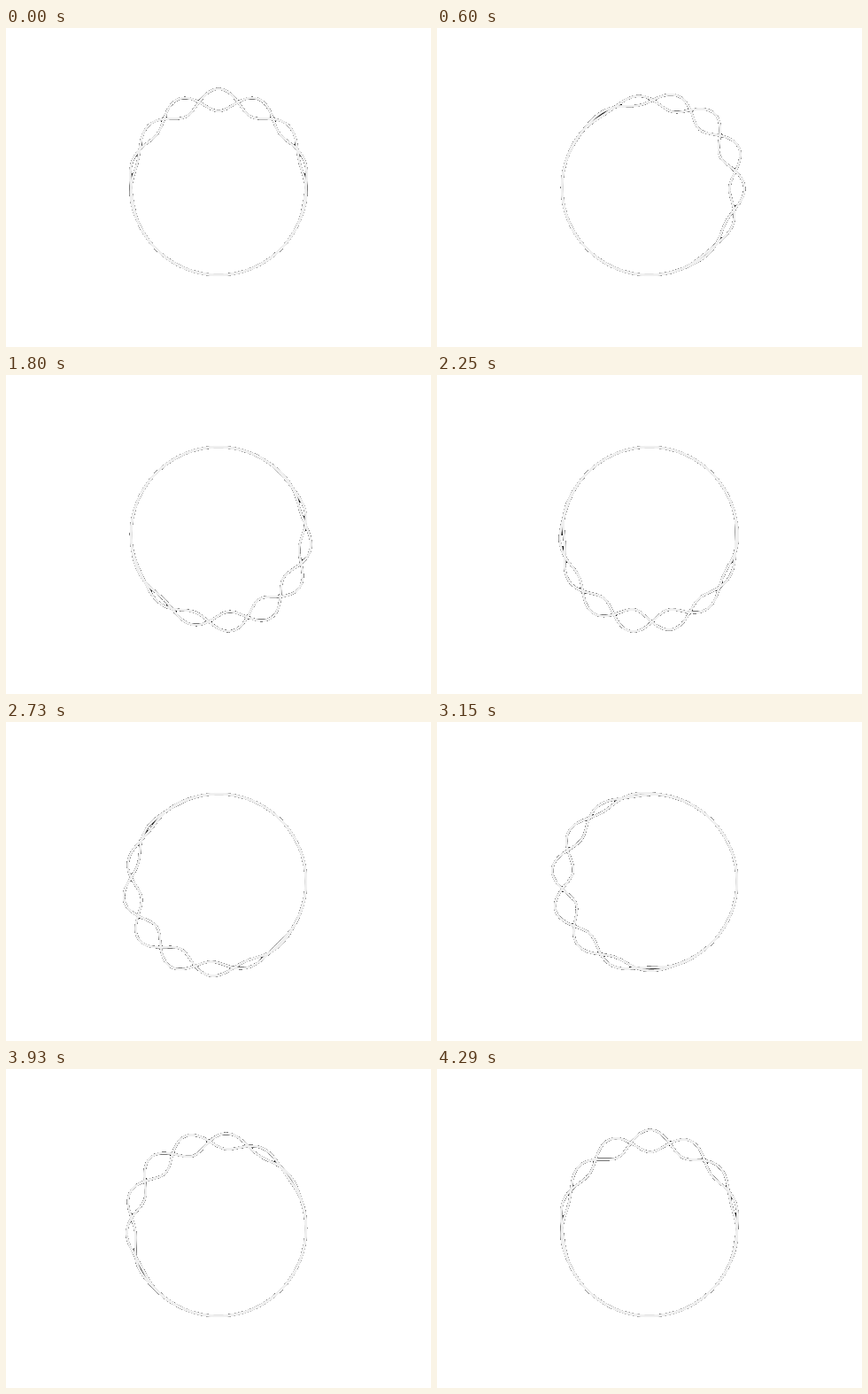
Animation, 480 px wide and 360 px high, one loop 4.32 s. Source, as an HTML page with a canvas:

```html
<!DOCTYPE html>
<html lang="en">
<head>
<meta charset="utf-8">
<title>Twisted ring</title>
<style>
  html, body { margin: 0; width: 100%; height: 100%; overflow: hidden; background: #fff; }
  canvas { display: block; }
</style>
</head>
<body>
<canvas id="stage" width="480" height="360"></canvas>
<script>
const W = 480, H = 360;
const LOOP = 4320, STEP = 30;
const RADIUS = 98.8, AMPLITUDE = 12.5, WAVES = 7, DRIFT = 3;
const STROKE = 3, POINTS = 480, MATTE = 0.5, TONE = 240;

const stage = document.getElementById('stage').getContext('2d');
const layer = document.createElement('canvas');
layer.width = W;
layer.height = H;
const ink = layer.getContext('2d', { willReadFrequently: true });
const output = stage.createImageData(W, H);

// Angles run clockwise from the top; the swell circles once per loop
// while the wave inside it drifts slowly the other way.
function strand(u, sign) {
  ink.beginPath();
  for (let i = 0; i < POINTS; i++) {
    const angle = i / POINTS * 2 * Math.PI;
    const swell = Math.cos(angle / 2 - Math.PI * u) ** 6;
    const wave = Math.cos(WAVES * angle + DRIFT * Math.PI * u);
    const r = RADIUS + sign * AMPLITUDE * swell * wave;
    ink.lineTo(W / 2 + r * Math.sin(angle), H / 2 - r * Math.cos(angle));
  }
  ink.closePath();
  ink.stroke();
}

// Pale strokes with dark-matted edges; narrow gaps between them stay dark.
function matte() {
  const cover = ink.getImageData(0, 0, W, H).data;
  const out = output.data;
  out.fill(255);
  for (let y = 1; y < H - 1; y++) {
    for (let x = 1; x < W - 1; x++) {
      const p = (y * W + x) * 4;
      let sum = 0;
      for (let dy = -1; dy <= 1; dy++) {
        for (let dx = -1; dx <= 1; dx++) sum += cover[p + (dy * W + dx) * 4 + 3];
      }
      if (sum > MATTE * 9 * 255) {
        out[p] = out[p + 1] = out[p + 2] = cover[p + 3] / 255 * TONE;
      }
    }
  }
  stage.putImageData(output, 0, 0);
}

function draw(time) {
  const u = Math.floor(time % LOOP / STEP) * STEP / LOOP;
  ink.clearRect(0, 0, W, H);
  ink.strokeStyle = '#fff';
  ink.lineWidth = STROKE;
  ink.lineJoin = 'round';
  strand(u, 1);
  strand(u, -1);
  matte();
}

const start = performance.now();
function tick() {
  draw(performance.now() - start);
  requestAnimationFrame(tick);
}
tick();
</script>
</body>
</html>
```
